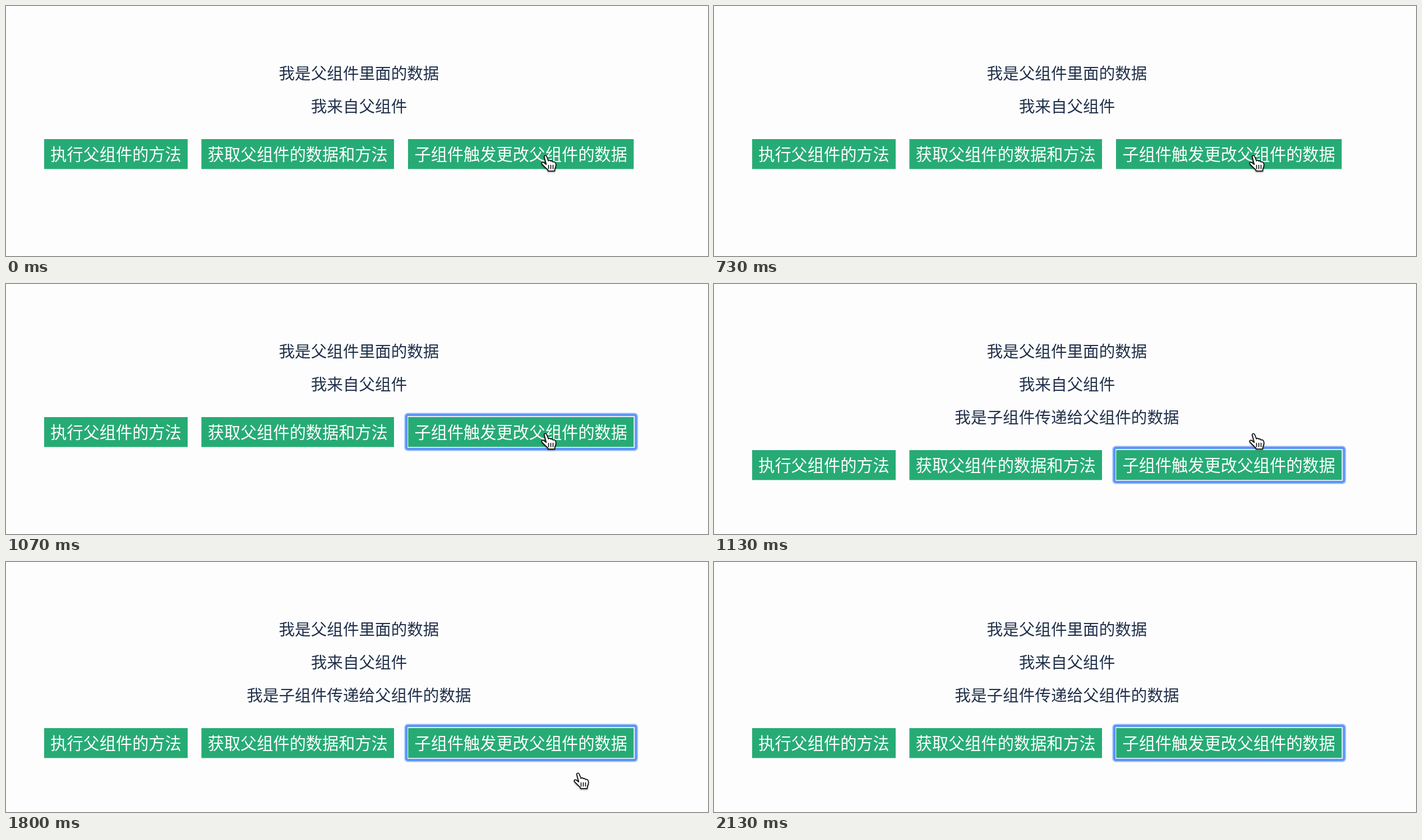
An HTML page for the animation above (2.19 s loop, 1252x447 px).

```html
<!DOCTYPE html>
<html lang="zh-CN">
<head>
<meta charset="utf-8">
<title>父子组件通信</title>
<style>
  html, body { margin: 0; width: 100%; height: 100%; overflow: hidden; background: #fdfdfd; }
  svg { display: block; width: 100%; height: 100%; }
  text { font-family: "Noto Sans CJK SC", "Noto Sans CJK", sans-serif; text-anchor: middle; }
  .line { font-size: 28.6px; fill: #20304a; }
  .label { font-size: 29.2px; font-weight: 300; fill: #fff; }
  .button { fill: #27ab75; }
  #ring rect { fill: none; }
</style>
</head>
<body>
<svg viewBox="0 0 1252 447">
  <defs>
    <filter id="shadow" x="-30%" y="-30%" width="160%" height="170%">
      <feDropShadow dx="0" dy="1.5" stdDeviation="1.2" flood-opacity=".4"/>
    </filter>
  </defs>
  <rect width="1252" height="447" fill="#fdfdfd"/>
  <g id="lines"></g>
  <g id="row">
    <g id="buttons"></g>
    <g id="ring">
      <rect x="711.5" y="231.5" width="414.5" height="66" rx="5" stroke="#a9c8fb" stroke-width="2.5"/>
      <rect x="714" y="234" width="409.5" height="61" rx="3" stroke="#5a94f5" stroke-width="4"/>
      <rect x="716.7" y="237" width="403.6" height="55" stroke="#d3e4f7" stroke-width="1.3"/>
    </g>
  </g>
  <g id="cursor" filter="url(#shadow)" stroke="#111" stroke-linejoin="round" stroke-linecap="round">
    <path fill="#fff" stroke-width="1.7" d="M6 4C5.4 1.4 9 .5 10.2 3L13.5 11C14 9.5 17 9.5 17.5 11.5C18.5 10.4 21 11 21.5 13C22.6 12 25.6 12.8 26.2 15C27.6 19 26.6 22 25 25L24.5 29.2H13L12 26.6C9 24 5.5 20.5 2 16.8C0 14 3 12.5 5 13.8L9.5 17.2Z"/>
    <path fill="none" stroke-width="1.6" d="M13.6 18.8V25M17.6 18.6V25M21.6 18.6V25"/>
  </g>
</svg>
<script>
  const LOOP = 2190, FOCUS = 1000, UPDATE = 1130, LEAVE = 1570;
  const $ = id => document.getElementById(id);

  function add(parent, tag, attrs, text = "") {
    const el = document.createElementNS("http://www.w3.org/2000/svg", tag);
    for (const key in attrs) el.setAttribute(key, attrs[key]);
    el.textContent = text;
    return parent.appendChild(el);
  }

  const lines = ["我是父组件里面的数据", "我来自父组件", "我是子组件传递给父组件的数据"].map((text, i) =>
    add($("lines"), "text", { class: "line", x: 629.5, y: 131.3 + 59 * i }, text));

  [
    [68, 256, "执行父组件的方法"],
    [348.5, 343.5, "获取父组件的数据和方法"],
    [717, 402.5, "子组件触发更改父组件的数据"]
  ].forEach(([x, width, text]) => {
    add($("buttons"), "rect", { class: "button", x, y: 238, width, height: 53.5 });
    add($("buttons"), "text", { class: "label", x: x + width / 2, y: 276.3 }, text);
  });

  const show = (el, on) => el.setAttribute("visibility", on ? "visible" : "hidden");

  function render(ms) {
    // The screen refreshes fifteen times a second, on 10 ms ticks.
    const step = Math.floor((ms + 4) * 3 / 200);
    const t = Math.round(step * 20 / 3) * 10;
    const updated = t >= UPDATE;
    const travel = (Math.max(0, t - LEAVE) / 230) ** 2;
    show($("ring"), t >= FOCUS);
    show(lines[2], updated);
    $("row").setAttribute("transform", `translate(0 ${updated ? 59 : 0})`);
    $("cursor").setAttribute("transform", `translate(${954 + 58 * travel} ${266 + 110 * travel})`);
  }

  const start = performance.now();
  function tick() {
    render((performance.now() - start) % LOOP);
    requestAnimationFrame(tick);
  }
  tick();
</script>
</body>
</html>
```
